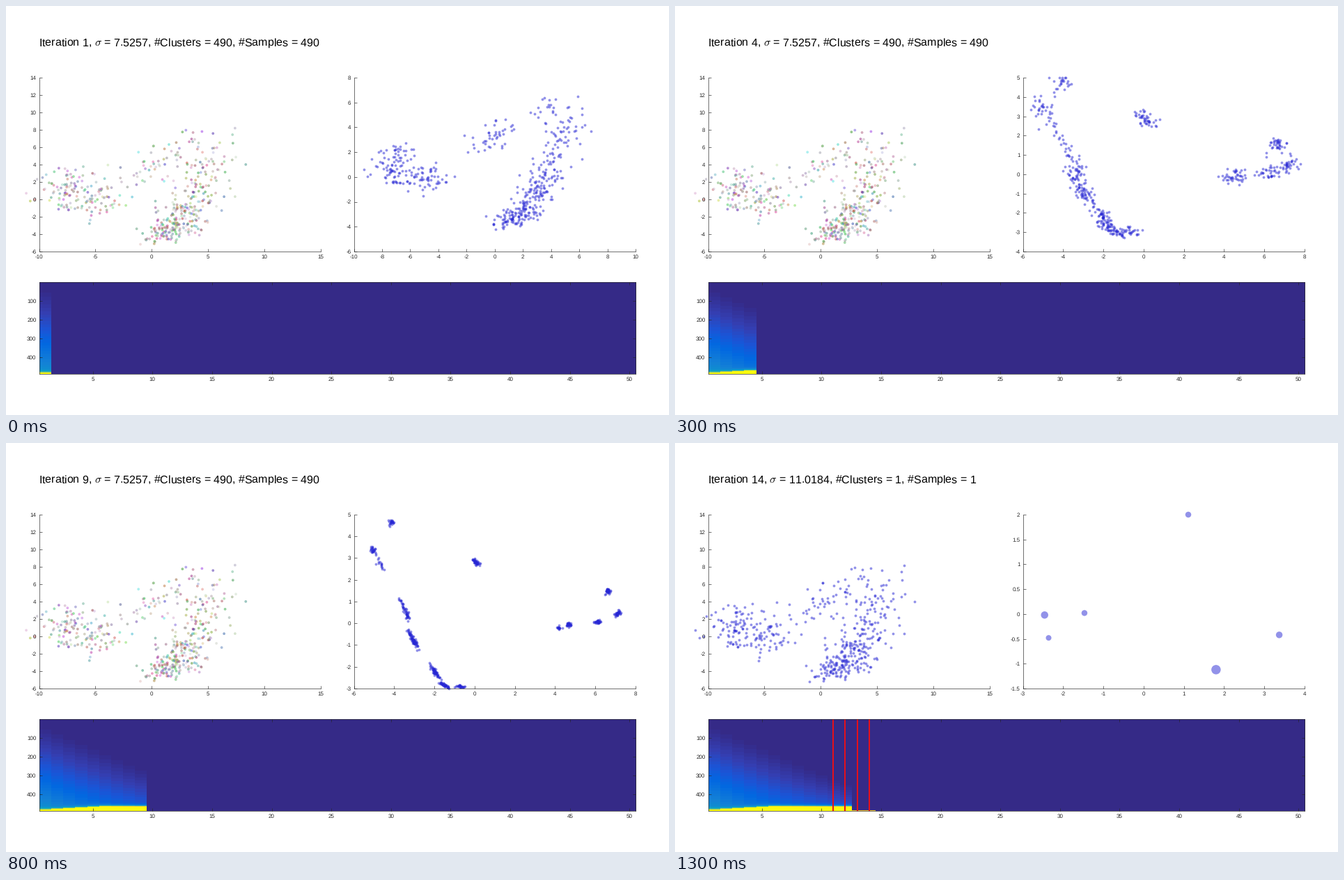
A matplotlib script for the animation above (1.4 s loop, 952x588 px).

```python
import numpy as np
import matplotlib.pyplot as plt
from matplotlib.animation import FuncAnimation
from matplotlib.colors import LinearSegmentedColormap, hsv_to_rgb, to_rgb

W, H, DPI = 952, 588, 100
PX = 72 / DPI
INK = (0.15, 0.15, 0.15)
DOT = 3.8

BLUE, RED, GREEN = "#2626d4", "#d42828", "#3cd732"
FOREST, MAGENTA, PINK = "#3c8c46", "#c83ccd", "#d7828c"
SLATE, LAVENDER, YELLOW = "#5a5082", "#b9b9d2", "#d7cd3c"
MERGED = {PINK: MAGENTA, LAVENDER: GREEN, YELLOW: GREEN}

plt.rcParams.update({
    "font.family": "Liberation Sans", "mathtext.fontset": "cm",
    "text.hinting": "none", "axes.edgecolor": INK,
    "axes.linewidth": 0.65 * PX,
})
rng = np.random.default_rng(12)

# Strands of places where samples gather: x, y, sample count, cluster colour.
STRANDS = [
    [(-4.17, 4.65, 24, PINK)],
    [(-5.05, 3.35, 25, MAGENTA), (-4.8, 2.9, 15, MAGENTA),
     (-3.45, 0.55, 45, BLUE), (-3.05, -0.75, 70, BLUE),
     (-2.0, -2.2, 60, RED), (-1.5, -2.84, 40, RED), (-0.75, -2.9, 25, RED)],
    [(0, 2.87, 25, FOREST), (0.12, 2.75, 17, FOREST)],
    [(4.2, -0.22, 15, SLATE), (4.68, -0.05, 27, SLATE), (6.1, 0.07, 29, YELLOW),
     (7.1, 0.47, 38, LAVENDER), (6.63, 1.48, 35, GREEN)],
]
# Merged samples: x, y, diameter.
NINE = [(2.05, 4.12, 12), (3.95, 2.33, 11.5), (-3.4, 0.8, 8.5),
        (-5.1, 0.21, 8), (-6, -0.55, 8.5), (-5.35, -1.53, 8.5),
        (1.35, -1.06, 8.5), (6.4, -1, 9), (6, -2.95, 7.5)]
SIX = [(1.11, 2, 8.5), (-2.46, -0.02, 10.5), (-1.47, 0.02, 8.5),
       (-2.36, -0.48, 8), (3.37, -0.42, 9.5), (1.8, -1.12, 13.5)]

homes, axes, clusters = [], [], []
for strand in STRANDS:
    path = np.array([row[:2] for row in strand])
    slope = np.gradient(path, axis=0) if len(path) > 1 else 0 * path
    if len(path) < 7:
        slope = slope * 0.3
    for spot, axis, (*_, count, color) in zip(path, slope, strand):
        homes += [spot] * count
        axes += [axis] * count
        clusters += [color] * count
homes, axes = np.array(homes), np.array(axes)
N = len(homes)
along = np.clip(rng.normal(size=(N, 1)), -2, 2)
noise = np.clip(rng.standard_t(6, size=(N, 2)), -3.2, 3.2)
pastel = hsv_to_rgb(np.column_stack([
    rng.random(N), rng.uniform(0.05, 0.8, N), rng.uniform(0.55, 0.9, N)]))


def sample_positions(it):
    """Samples contract towards their homes; 0 is the raw data."""
    scale = 1 + np.array([0.04, 0.16]) * 0.5 ** (it - 1)
    stretch = 0.7 * np.exp(-0.16 * it)
    width = 0.85 * np.exp(-0.62 * it ** 0.73)
    loose = 0.7 + 0.1 * (homes[:, 1:] + 3)
    xy = homes * scale + axes * stretch * along + noise * loose * width * (1.2, 1)
    return xy * (-1, 1) if it < 2 else xy


def limits(it):
    """Low, high and tick step of x and y in the embedding panel."""
    if it == 1:
        return (-10, 10, 2), (-6, 8, 2)
    if it <= 3:
        return (-8, 8, 2), (-4, 6, 1)
    if it <= 12:
        return (-6, 8, 2), (-4 if it <= 7 else -3, 5, 1)
    return (-3, 4, 1), (-1.5, 2, 0.5)


def spectrum():
    r = np.arange(1, 491)
    out = np.zeros((490, 50))
    for k in range(12):
        first = 25 + 28 * k
        ramp = np.clip((r - first) / (465 - first), 0, None) ** 1.2
        tail = np.exp((r - max(468, 487 - 4 * k)) / 5)
        out[:, k] = 0.4 * np.exp(-0.08 * k) * ramp + tail
    out[-4:, 12:14] = 0.9
    return np.clip(out, 0, 1)


PARULA = LinearSegmentedColormap.from_list("heat", [
    (0, "#352a87"), (0.1, "#3440b4"), (0.18, "#1b55d7"), (0.25, "#0268e1"),
    (0.36, "#1481d6"), (0.5, "#06a7c6"), (0.65, "#59bd8c"), (0.8, "#bebc67"),
    (0.9, "#fcce2e"), (1, "#f9fb0e")], N=64)
SPECTRUM = spectrum()

fig = plt.figure(figsize=(W / DPI, H / DPI), dpi=DPI, facecolor="white")


def panel(x0, y0, x1, y1, box=False):
    ax = fig.add_axes([x0 / W, 1 - y1 / H, (x1 - x0) / W, (y1 - y0) / H])
    ax.patch.set_visible(False)
    ax.tick_params(direction="in", length=4 * PX, width=0.65 * PX, color=INK,
                   labelcolor=INK, labelsize=8 * PX, pad=4 * PX,
                   top=box, right=box)
    ax.tick_params(axis="x", pad=4.6 * PX)
    ax.spines[["top", "right"]].set_visible(box)
    return ax


def set_axes(ax, xs, ys):
    for axis, (low, high, step) in ((ax.xaxis, xs), (ax.yaxis, ys)):
        ticks = np.arange(low, high + step / 2, step)
        axis.set_ticks(ticks, [f"{t:g}" for t in ticks])
    ax.set_xlim(xs[:2])
    ax.set_ylim(ys[:2])


def area(diameter):
    return (np.asarray(diameter) * PX) ** 2


def dots(ax, xy, colors):
    return ax.scatter(*xy.T, s=area(DOT), c=colors, alpha=0.5,
                      linewidths=0, clip_on=False)


left = panel(47.5, 103, 452, 353)
set_axes(left, (-10, 15, 5), (-6, 14, 2))
raw = sample_positions(0)
raw[:, 1] = np.maximum(raw[:, 1], -5.65)
samples = dots(left, raw, pastel)

right = panel(499.5, 103, 904, 353)
points = dots(right, raw, [to_rgb(BLUE)] * N)
points.set_facecolor(BLUE)

heat = panel(47.5, 397, 904, 529, box=True)
image = heat.imshow(SPECTRUM, cmap=PARULA, vmin=0, vmax=1, aspect="auto",
                    interpolation="nearest", extent=(0.5, 50.5, 490.5, 0.5))
heat.set_xticks(range(5, 51, 5))
heat.set_yticks(range(100, 401, 100))
marks = {k: heat.axvline(k, color="#e6101a", lw=2 * PX) for k in range(11, 15)}

title = fig.text(46.8 / W, 1 - 57.5 / H, "", fontsize=16.05 * PX, color="black")


def sample_colors(it):
    if it < 12:
        return pastel
    if it == 14:
        return BLUE
    return [to_rgb(c if it == 12 else MERGED.get(c, c)) for c in clusters]


def update(frame):
    it = frame + 1
    sigma = 7.5257 * 1.1 ** max(0, it - 10)
    count = {12: 9, 13: 6, 14: 1}.get(it, N)
    title.set_text(rf"Iteration {it}, $\sigma$ = {sigma:.4f}, "
                   f"#Clusters = {count}, #Samples = {count}")
    samples.set_facecolor(sample_colors(it))

    xs, ys = limits(it)
    if it < 12:
        xy, diameters = sample_positions(it), [DOT]
    else:
        merged = np.array(NINE if it == 12 else SIX)
        xy, diameters = merged[:, :2], merged[:, 2]
    points.set_offsets(np.clip(xy, (xs[0], ys[0]), (xs[1], ys[1])))
    points.set_sizes(area(diameters))
    set_axes(right, xs, ys)

    image.set_data(np.where(np.arange(50) < it, SPECTRUM, 0))
    for k, line in marks.items():
        line.set_visible(k <= it)
    return samples, points, image, title


anim = FuncAnimation(fig, update, frames=14, interval=100, repeat=True)
plt.show()
```
